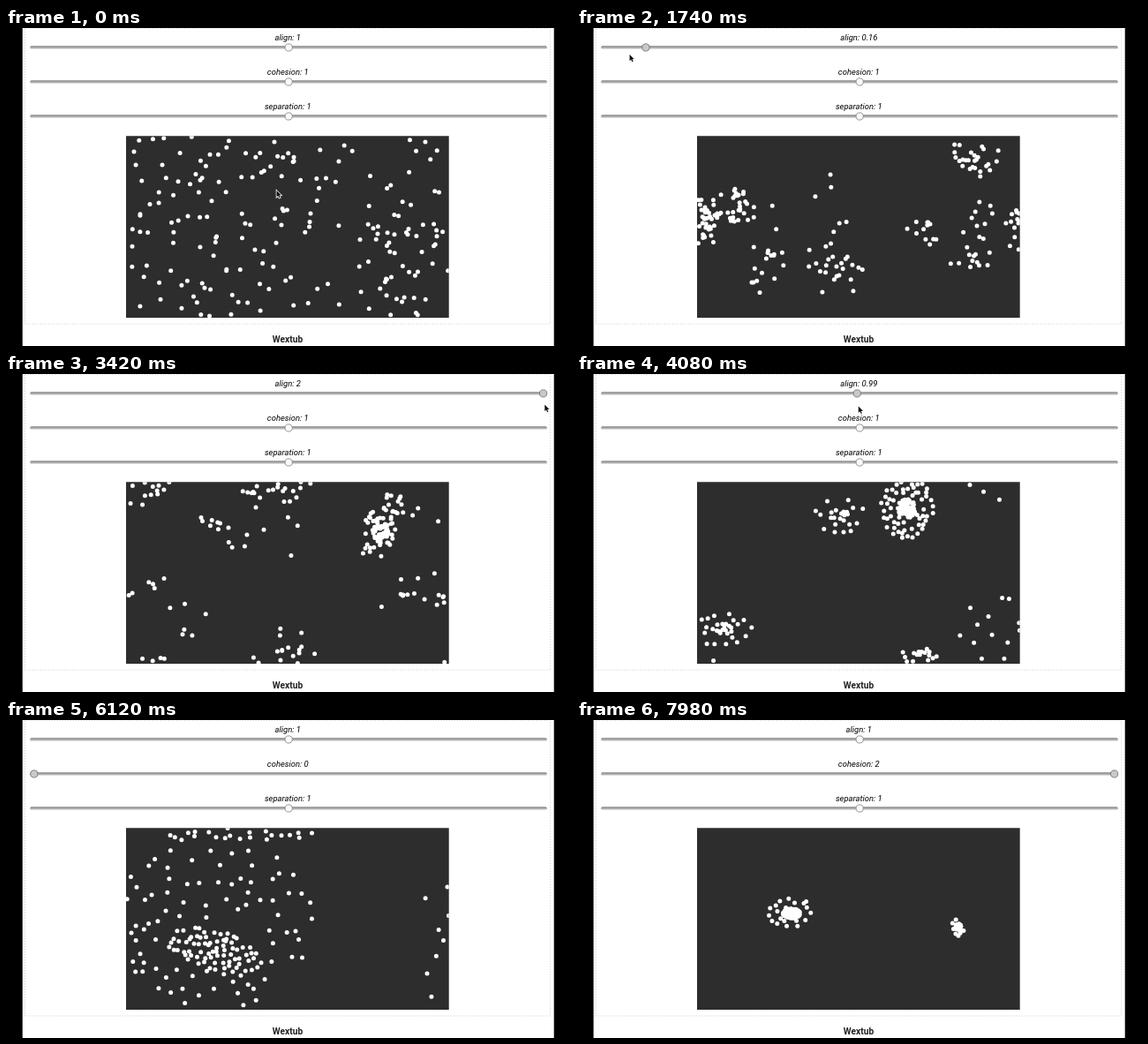
These frames come from a looping animation (640x360 px, 8000 ms). An HTML page with a canvas:

```html
<!DOCTYPE html>
<html lang="en">
<head>
<meta charset="utf-8">
<title>Flocking</title>
<style>
  html, body { margin: 0; width: 100%; height: 100%; overflow: hidden; background: #000; }
  canvas { display: block; width: 640px; height: 360px; }
</style>
</head>
<body>
<canvas id="stage" width="640" height="360"></canvas>
<script>
const ctx = document.getElementById('stage').getContext('2d');
const LOOP = 8000, STEP = 60, COUNT = 190;
const PAGE = { x: 18.7, w: 602 };
const FIELD = { x: 136, y: 122.3, w: 365.7, h: 205.7 };

let seed = 20;
function rand() {
  seed = (seed + 0x6D2B79F5) | 0;
  let r = Math.imul(seed ^ (seed >>> 15), 1 | seed);
  r = (r + Math.imul(r ^ (r >>> 7), 61 | r)) ^ r;
  return ((r ^ (r >>> 14)) >>> 0) / 4294967296;
}

const mod = (a, n) => ((a % n) + n) % n;
const clamp = (v, lo, hi) => Math.min(hi, Math.max(lo, v));
// Shortest signed step on a wrapping axis
const near = (d, size) => d - size * Math.round(d / size);
const dist2 = (a, b) => near(a.x - b.x, FIELD.w) ** 2 + near(a.y - b.y, FIELD.h) ** 2;

function inEllipse(x, y, rx, ry, tilt = 0) {
  const a = rand() * Math.PI * 2, r = Math.sqrt(rand());
  const u = Math.cos(a) * r * rx, v = Math.sin(a) * r * ry;
  const c = Math.cos(tilt), s = Math.sin(tilt);
  return { x: x + u * c - v * s, y: y + u * s + v * c };
}

// Adds n points, each the roomiest of a few tries
function spread(list, n, ...shape) {
  for (let i = 0; i < n; i++) {
    let best, room = -1;
    for (let k = 0; k < 5; k++) {
      const p = inEllipse(...shape);
      const d = list.reduce((m, q) => Math.min(m, dist2(p, q)), 1e9);
      if (d > room) { room = d; best = p; }
    }
    list.push(best);
  }
}

// Groups are [n, x, y, rx, ry]; a share of each tight group packs into its core
function flock(core, tight, loose = []) {
  const list = [];
  for (const [n, x, y, rx, ry] of tight) {
    const packed = Math.round(n * core);
    spread(list, packed, x, y, rx * 0.35, ry * 0.32);
    spread(list, n - packed, x, y, rx, ry);
  }
  for (const group of loose) spread(list, ...group);
  return list;
}

const scattered = Array.from({ length: COUNT }, () => ({
  x: FIELD.x + rand() * FIELD.w, y: FIELD.y + rand() * FIELD.h
}));

const poses = [
  { t: 0, dots: scattered },
  { t: 840, dots: flock(0.35,
    [[100, 178, 229, 43, 50], [42, 324, 243, 42, 44], [40, 432, 308, 38, 44]],
    [[8, 442, 235, 25, 44]]) },
  { t: 2760, dots: flock(0.45,
    [[110, 463, 202, 38, 38], [40, 266, 301, 42, 42], [30, 181, 178, 26, 28]],
    [[10, 240, 200, 60, 65]]) },
  { t: 4080, dots: flock(0.45,
    [[105, 374, 152, 30, 34], [24, 297, 160, 30, 22], [32, 165, 289, 33, 20], [14, 388, 317, 22, 8]],
    [[15, 478, 305, 50, 55]]) },
  { t: 5220, dots: flock(0.55,
    [[118, 258, 183, 38, 36], [22, 172, 183, 24, 16], [14, 285, 268, 16, 12],
     [8, 391, 294, 16, 12], [6, 396, 138, 14, 12]],
    [[22, 230, 205, 100, 80]]) },
  { t: 6120, dots: flock(0, [],
    [[80, 236, 262, 56, 24, 0.28], [88, 235, 228, 115, 102], [18, 270, 130, 90, 6],
     [4, 482, 255, 25, 62]]) },
  { t: 7980, dots: flock(0.86, [[140, 243, 219, 28, 17], [50, 432, 234, 9, 11]]) }
];

// Reorders next so that each point has a short way to go
function match(prev, next) {
  for (let pass = 0; pass < 8; pass++)
    for (let i = 0; i < COUNT; i++)
      for (let j = 0; j < i; j++) {
        const now = dist2(prev[i], next[i]) + dist2(prev[j], next[j]);
        const swapped = dist2(prev[i], next[j]) + dist2(prev[j], next[i]);
        if (swapped < now) [next[i], next[j]] = [next[j], next[i]];
      }
}
for (let k = 1; k < poses.length; k++) match(poses[k - 1].dots, poses[k].dots);

// Both final groups arrive already packed, in a straight glide
const settled = poses.pop();
const glide = p => p.x < 350 ? { x: p.x - 36, y: p.y + 44 } : { x: p.x + 23, y: p.y - 57 };
poses.push({ t: 7560, dots: settled.dots.map(glide) }, settled);

// Unwrapped routes through all poses
const routes = scattered.map((p, i) => {
  const route = [p];
  for (let k = 1; k < poses.length; k++) {
    const a = route[k - 1], b = poses[k].dots[i];
    route.push({ x: a.x + near(b.x - a.x, FIELD.w), y: a.y + near(b.y - a.y, FIELD.h) });
  }
  return { route, phase: rand() * Math.PI * 2 };
});

function slope(route, k, axis) {
  const a = Math.max(0, k - 1), b = Math.min(poses.length - 1, k + 1);
  return (route[b][axis] - route[a][axis]) / (poses[b].t - poses[a].t);
}

function hermite(route, k, u, axis) {
  const span = poses[k + 1].t - poses[k].t, v = 1 - u;
  return route[k][axis] * (1 + 2 * u) * v * v + route[k + 1][axis] * u * u * (3 - 2 * u)
    + span * u * v * (slope(route, k, axis) * v - slope(route, k + 1, axis) * u);
}

function drawFlock(t) {
  let k = 0;
  while (k < poses.length - 2 && t >= poses[k + 1].t) k++;
  const u = clamp((t - poses[k].t) / (poses[k + 1].t - poses[k].t), 0, 1);
  const sway = k === poses.length - 2 ? 0 : 8 * Math.sin(Math.PI * u);

  ctx.save();
  ctx.beginPath();
  ctx.rect(FIELD.x, FIELD.y, FIELD.w, FIELD.h);
  ctx.fillStyle = '#2d2d2d';
  ctx.fill();
  ctx.clip();
  ctx.fillStyle = '#fff';
  ctx.beginPath();
  for (const { route, phase } of routes) {
    const a = phase + t * 0.006;
    const x = FIELD.x + mod(hermite(route, k, u, 'x') + sway * Math.cos(a) - FIELD.x, FIELD.w);
    const y = FIELD.y + mod(hermite(route, k, u, 'y') + sway * Math.sin(a) - FIELD.y, FIELD.h);
    ctx.moveTo(x + 2.5, y);
    ctx.arc(x, y, 2.5, 0, Math.PI * 2);
  }
  ctx.fill();
  ctx.restore();
}

// Pointer path: time, x, y
const path = [
  [0, 306.5, 184], [240, 306.5, 184], [600, 324, 1], [840, 319, 22], [1860, 25, 31],
  [2284, 25, 31], [2760, 445, 31], [2950, 612, 33], [3480, 610, 35], [4020, 317.5, 36],
  [4140, 320, 37], [4660, 320, 63], [5040, 205, 67], [5430, 28, 69], [5880, 28, 69],
  [6060, 5, 69], [6650, 8, 68], [7380, 590, 68], [7440, 660, 68], [LOOP, 660, 68]
];

function pointer(t) {
  const i = clamp(path.findIndex(p => p[0] > t), 1, path.length - 1);
  const [t0, x0, y0] = path[i - 1], [t1, x1, y1] = path[i];
  const u = (t - t0) / (t1 - t0);
  return { x: x0 + (x1 - x0) * u, y: y0 + (y1 - y0) * u };
}

const thumbX = value => 31.8 + 288.4 * value;

// The thumb trails the pointer by one step
function dragged(t, from, to) {
  if (t < from || t >= to) return 1;
  const value = (pointer(t - STEP).x - thumbX(0)) / 288.4;
  return Math.round(clamp(value, 0, 2) * 100) / 100;
}

function drawSlider(name, y, value, active) {
  ctx.font = 'italic 9.45px Roboto, sans-serif';
  ctx.textAlign = 'center';
  ctx.fillStyle = '#000';
  ctx.fillText(`${name}: ${value}`, 319.3, y - 7.8);

  ctx.beginPath();
  ctx.roundRect(27, y - 1.6, 586, 3.2, 1.6);
  ctx.fillStyle = '#b4b4b4';
  ctx.fill();
  ctx.fillStyle = '#8a8a8a';
  ctx.fillRect(28, y - 1.6, 584, 1.2);

  ctx.beginPath();
  ctx.arc(thumbX(value), y, 4.1, 0, Math.PI * 2);
  ctx.fillStyle = active ? '#c9c9c9' : '#fafafa';
  ctx.fill();
  ctx.lineWidth = 0.9;
  ctx.strokeStyle = active ? '#777' : '#8c8c8c';
  ctx.stroke();
}

function drawPage() {
  ctx.fillStyle = '#000';
  ctx.fillRect(0, 0, 640, 360);
  ctx.fillStyle = '#fff';
  ctx.fillRect(PAGE.x, 0, PAGE.w, 360);
  ctx.setLineDash([1.5, 1.5]);
  ctx.lineWidth = 0.7;
  ctx.strokeStyle = '#ccc';
  ctx.strokeRect(21.5, 0.5, 595, 334.5);
  ctx.setLineDash([]);
  ctx.font = 'bold 10.2px Roboto, sans-serif';
  ctx.textAlign = 'center';
  ctx.fillStyle = '#222';
  ctx.fillText('Wextub', 319, 356.3);
}

function drawPointer({ x, y }) {
  ctx.save();
  ctx.beginPath();
  ctx.rect(PAGE.x, 0, PAGE.w, 360);
  ctx.clip();
  ctx.translate(x, y);
  ctx.beginPath();
  ctx.moveTo(0, 0);
  for (const [px, py] of [[0, 7.4], [1.7, 5.8], [2.9, 8.6], [4.1, 8.1], [2.9, 5.4], [5.2, 5.3]])
    ctx.lineTo(px, py);
  ctx.closePath();
  ctx.lineWidth = 1.5;
  ctx.strokeStyle = '#fff';
  ctx.stroke();
  ctx.fillStyle = '#111';
  ctx.fill();
  ctx.restore();
}

function draw(now) {
  const t = Math.floor((now % LOOP) / STEP) * STEP;
  drawPage();
  drawSlider('align', 22, dragged(t, 900, 4200), t >= 780 && t < 4260);
  drawSlider('cohesion', 61, dragged(t, 4680, LOOP), t >= 4440);
  drawSlider('separation', 100, 1, false);
  drawFlock(t);
  drawPointer(pointer(t));
  requestAnimationFrame(draw);
}
requestAnimationFrame(draw);
</script>
</body>
</html>
```
